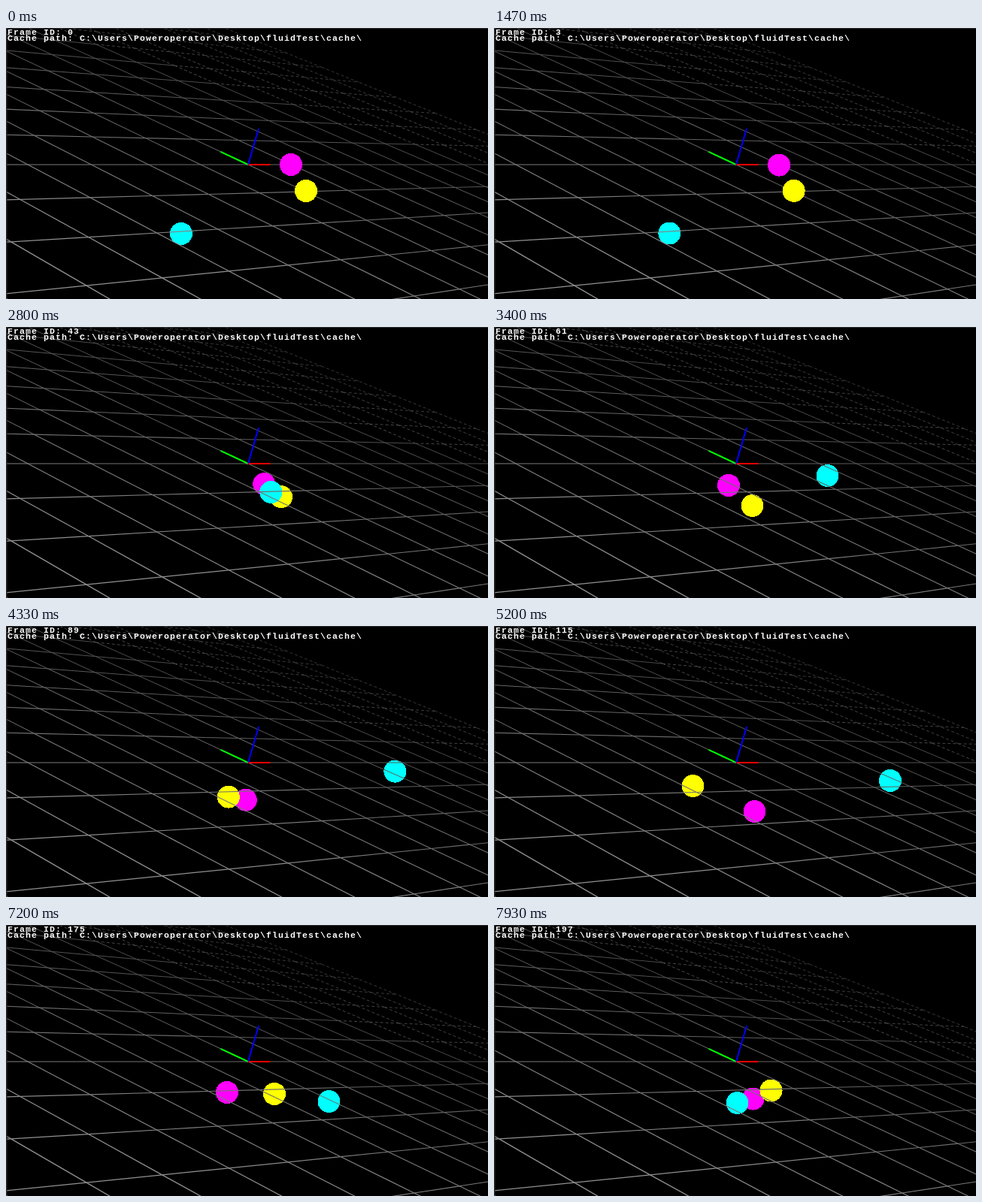
Recreate the animation shown at these times as an HTML page. Size 641 by 361 pixels, loop 8 s.

```html
<!DOCTYPE html>
<html lang="en">
<head>
<meta charset="utf-8">
<title>Three bodies over a grid</title>
<style>
  html, body { margin: 0; width: 100%; height: 100%; overflow: hidden; background: #000; }
  svg { display: block; width: 641px; height: 361px; }
  circle { shape-rendering: crispEdges; }
  text {
    font: bold 11.5px "Liberation Mono", "DejaVu Sans Mono", monospace;
    letter-spacing: 1.1px;
    fill: #fff;
    white-space: pre;
  }
</style>
</head>
<body>
<svg viewBox="0 0 641 361">
  <rect width="641" height="361" fill="#000"/>
  <g id="under"></g>
  <g id="grid"></g>
  <g id="axes" stroke-width="2"></g>
  <g id="over"></g>
  <path d="M0 0H641V1H1.5V361H0Z" fill="#2a2a2a"/>
  <text id="label" x="2" y="9">Frame ID: 0</text>
  <text x="2" y="17">Cache path: C:\Users\Poweroperator\Desktop\fluidTest\cache\</text>
</svg>
<script>
const LOOP = 8000, HOLD = 1400;
const CELLS = 10;   // grid cells on each side of the origin
const RADIUS = 15;
const SINK = 30;    // step at which the near pair drops below the plane
const $ = id => document.getElementById(id);

function add(parent, tag, attrs) {
  const el = document.createElementNS('http://www.w3.org/2000/svg', tag);
  for (const key in attrs) el.setAttribute(key, attrs[key]);
  parent.appendChild(el);
  return el;
}

// Ground plane to screen, from the origin and the vanishing point of each axis.
const origin = [322, 182];
const red = { vanish: [1690, 182], rate: 0.0441 };
const green = { vanish: [-2252, -1028], rate: 0.0288 };
const depth = (i, j) => 1 + red.rate * i + green.rate * j;
const project = (i, j) => origin.map((o, k) =>
  (o + red.vanish[k] * red.rate * i + green.vanish[k] * green.rate * j) / depth(i, j));

function line(parent, [x1, y1], [x2, y2], attrs) {
  add(parent, 'line', { x1, y1, x2, y2, ...attrs });
}

// One cell edge, fading and breaking up with distance.
function cellEdge(i, j, di, dj) {
  const w = depth(i + di / 2, j + dj / 2);
  const g = Math.round(Math.min(145, 104 / w));
  line($('grid'), project(i, j), project(i + di, j + dj), {
    stroke: `rgb(${g},${g},${g})`,
    'stroke-width': Math.min(1.3, 1.05 / Math.sqrt(w)),
    'stroke-dasharray': w > 1.3 ? '4 3' : 'none'
  });
}

for (let n = -CELLS; n <= CELLS; n++) {
  for (let m = -CELLS; m < CELLS; m++) {
    cellEdge(m, n, 1, 0);
    cellEdge(n, m, 0, 1);
  }
}

line($('axes'), origin, project(0.5, 0), { stroke: '#f00' });
line($('axes'), origin, project(0, 0.5), { stroke: '#0f0' });
line($('axes'), origin, [336, 134], { stroke: '#00f' });

// Smooth curve through the key points, starting at rest.
function curve(t, v) {
  const last = t.length - 1, m = t.map(() => 0);
  const h = n => t[n + 1] - t[n];
  const rate = n => (v[n + 1] - v[n]) / h(n);
  for (let pass = 0; pass < 40; pass++) {
    for (let n = 1; n < last; n++) {
      const p = 1 / h(n - 1), q = 1 / h(n);
      m[n] = (3 * (p * rate(n - 1) + q * rate(n)) - p * m[n - 1] - q * m[n + 1]) / (2 * (p + q));
    }
    m[last] = (3 * rate(last - 1) - m[last - 1]) / 2;
  }
  return x => {
    let n = 0;
    while (n < last - 1 && t[n + 1] <= x) n++;
    const u = (x - t[n]) / h(n), w = 1 - u;
    return w * w * ((1 + 2 * u) * v[n] + u * h(n) * m[n]) +
           u * u * ((1 + 2 * w) * v[n + 1] - w * h(n) * m[n + 1]);
  };
}

const keys = [0, 25, 61, 115, 143, 175, 197];
function makeBall(fill, xs, ys) {
  return {
    el: add($('under'), 'circle', { fill, r: RADIUS }),
    x: curve(keys, xs),
    y: curve(keys, ys)
  };
}

const magenta = makeBall('#f0f', [379, 374.5, 312, 346.5, 337.5, 294, 344.5],
                                 [182, 203, 211, 247, 235, 223, 231.5]);
const yellow = makeBall('#ff0', [399, 383.5, 343.5, 264.5, 281.5, 357, 368.5],
                                [217, 214.5, 238, 213, 220, 225, 220.5]);
const cyan = makeBall('#0ff', [233, 269.5, 443.5, 527, 506, 429.5, 323.5],
                              [274, 249, 198, 206, 218.5, 235, 237]);

// Fifteen updates a second on a 10 ms clock, two simulation steps each.
function stepAt(ms) {
  if (ms < HOLD) return 0;
  const u = ms - HOLD, r = u % 200;
  return 1 + 2 * (3 * Math.floor(u / 200) + (r >= 70) + (r >= 130));
}

function draw(ms) {
  const step = stepAt(ms);
  $('label').textContent = 'Frame ID: ' + step;
  for (const ball of [magenta, yellow, cyan]) {
    const above = ball !== cyan && step < SINK;
    $(above ? 'over' : 'under').appendChild(ball.el);
    ball.el.setAttribute('cx', ball.x(step));
    ball.el.setAttribute('cy', ball.y(step));
  }
}

const start = performance.now();
function tick() {
  draw((performance.now() - start) % LOOP);
  requestAnimationFrame(tick);
}
tick();
</script>
</body>
</html>
```
